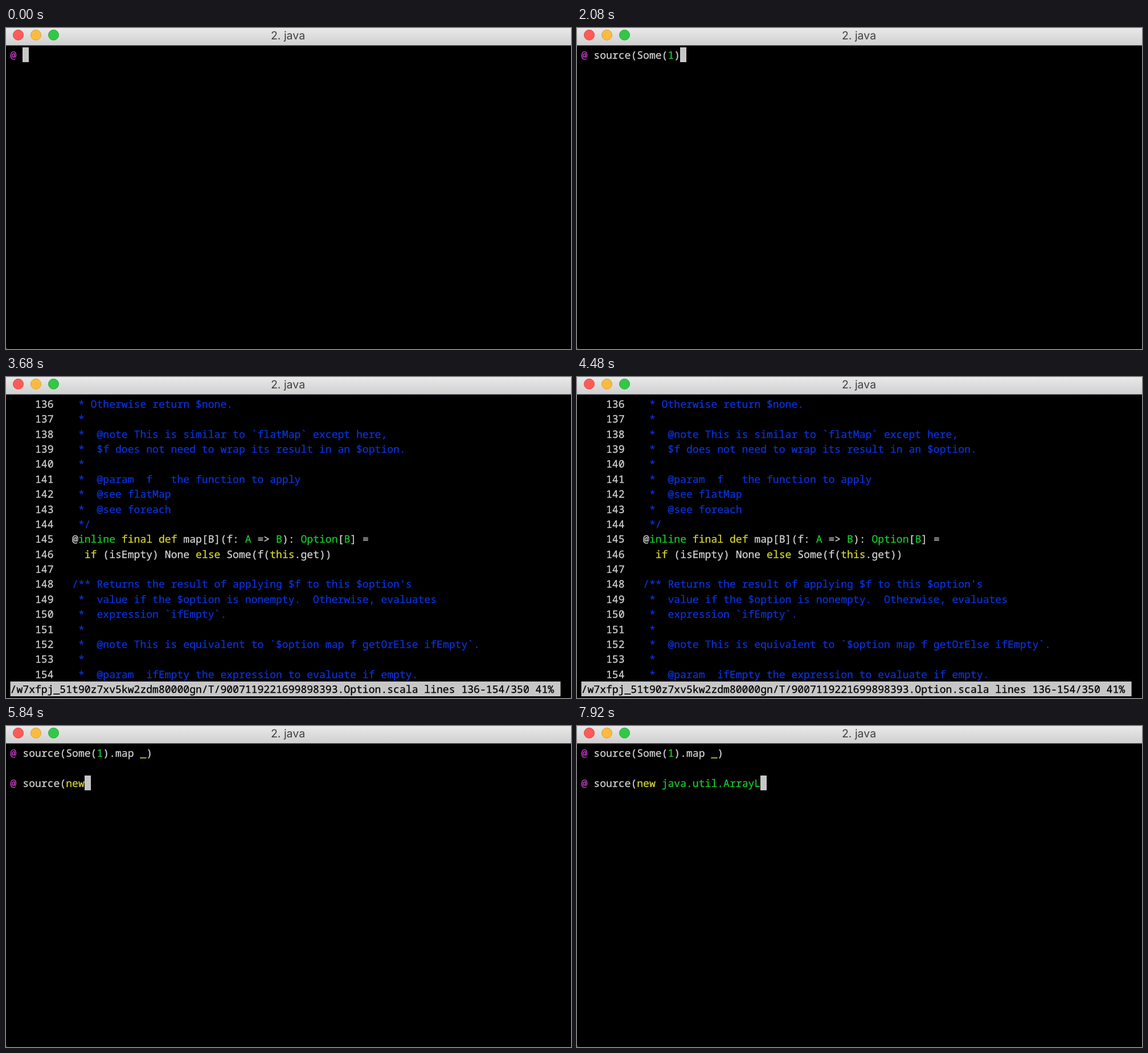
An HTML page that plays this animation: 992x564 px, repeating every 8000 ms.

```html
<!DOCTYPE html>
<html lang="en">
<head>
<meta charset="utf-8">
<title>Terminal</title>
<style>
  html, body { margin: 0; width: 100%; height: 100%; overflow: hidden; background: #000; }
  svg { display: block; width: 992px; height: 564px; }
  text { white-space: pre; text-rendering: geometricPrecision; }
  .mono { font: 18.09px "Noto Sans Mono", "DejaVu Sans Mono", monospace; }
  .mono tspan { stroke-width: 0.3px; }
  .title { font: 19.5px Inter, Roboto, sans-serif; fill: #404040; text-anchor: middle; }
</style>
</head>
<body>
<svg viewBox="0 0 992 564">
  <defs>
    <linearGradient id="bar" x2="0" y2="1">
      <stop offset="0" stop-color="#e9e9e9"/>
      <stop offset="1" stop-color="#d0d0d0"/>
    </linearGradient>
  </defs>
  <rect width="992" height="564"/>
  <g id="shell" class="mono">
    <path d="M0 560V564H3Q0.5 563 0 560Z" fill="#3a3a3a"/>
    <rect id="cursor" width="11" height="26" fill="#c7c7c7"/>
  </g>
  <g id="pager" class="mono"></g>
  <rect width="992" height="30" fill="url(#bar)"/>
  <rect y="30" width="992" height="1" fill="#747884"/>
  <g id="lights" stroke-width="1"></g>
  <text class="title" x="495" y="20">2. java</text>
</svg>
<script>
const LOOP = 8000, STEP = 80;
const LEFT = 7.6, TOP = 34, COL = 10.854, ROW = 26.37;
const PAGER_OPEN = 3200, PAGER_CLOSE = 4560, ENTER = 2880;
const COLORS = {
  w: "#d4d4d4", m: "#c93cc9", g: "#18cb2c", y: "#d6d634", b: "#0a33dc", k: "#000"
};

const $ = id => document.getElementById(id);

function add(parent, tag, attrs, content = "") {
  const el = document.createElementNS("http://www.w3.org/2000/svg", tag);
  for (const key in attrs) el.setAttribute(key, attrs[key]);
  el.textContent = content;
  parent.appendChild(el);
  return el;
}

const addRow = (parent, row) =>
  add(parent, "text", { x: LEFT, y: TOP + 20 + row * ROW });

// Runs are [color key, text] pairs.
function fill(el, runs) {
  el.textContent = "";
  for (const [key, text] of runs) {
    add(el, "tspan", { fill: COLORS[key], stroke: COLORS[key] }, text);
  }
}

// A keyword takes its color only once it is complete.
function cut(runs, count) {
  const shown = [];
  for (const [color, text] of runs) {
    if (count <= 0) break;
    const part = text.slice(0, count);
    shown.push([color === "y" && part !== text ? "w" : color, part]);
    count -= text.length;
  }
  return shown;
}

const first = {
  row: 0, keys: [[400, 0], [2080, 14.4], [2800, 21]],
  runs: [["w", "source(Some("], ["g", "1"], ["w", ").map "], ["y", "_"], ["w", ")"]]
};
const second = {
  row: 2, keys: [[4700, 0], [5040, 3.3], [5840, 10.3], [7200, 22.3], [7920, 27.3]],
  runs: [["w", "source("], ["y", "new"], ["w", " "], ["g", "java.util.ArrayL"]]
};

function typedCount(keys, t) {
  if (t <= keys[0][0]) return 0;
  for (let i = 1; i < keys.length; i++) {
    const [t0, n0] = keys[i - 1], [t1, n1] = keys[i];
    if (t <= t1) return Math.floor(n0 + (n1 - n0) * (t - t0) / (t1 - t0));
  }
  return Math.floor(keys[keys.length - 1][1]);
}

const doc = text => [["b", text]];
const listing = [
  doc("   * Otherwise return $none."),
  doc("   *"),
  doc("   *  @note This is similar to `flatMap` except here,"),
  doc("   *  $f does not need to wrap its result in an $option."),
  doc("   *"),
  doc("   *  @param  f   the function to apply"),
  doc("   *  @see flatMap"),
  doc("   *  @see foreach"),
  doc("   */"),
  [["w", "  @"], ["g", "inline"], ["y", " final def"], ["w", " map[B](f: "], ["g", "A"],
   ["w", " => "], ["g", "B"], ["w", "): "], ["g", "Option"], ["w", "["], ["g", "B"], ["w", "] ="]],
  [["y", "    if"], ["w", " (isEmpty) None "], ["y", "else"], ["w", " Some(f("],
   ["y", "this"], ["w", ".get))"]],
  doc(""),
  doc("  /** Returns the result of applying $f to this $option's"),
  doc("   *  value if the $option is nonempty.  Otherwise, evaluates"),
  doc("   *  expression `ifEmpty`."),
  doc("   *"),
  doc("   *  @note This is equivalent to `$option map f getOrElse ifEmpty`."),
  doc("   *"),
  doc("   *  @param  ifEmpty the expression to evaluate if empty.")
];
const status = "/w7xfpj_51t90z7xv5kw2zdm80000gn/T/9007119221699898393.Option.scala lines 136-154/350 41%";

function build() {
  const lights = [["#fc5b57", "#e2473f"], ["#fabb40", "#dfa032"], ["#33c748", "#25ab35"]];
  lights.forEach(([color, edge], i) =>
    add($("lights"), "circle", { cx: 21.5 + 31 * i, cy: 12.3, r: 9, fill: color, stroke: edge }));

  const pager = $("pager");
  listing.forEach((runs, i) =>
    fill(addRow(pager, i), [["w", `    ${136 + i} `], ...runs]));
  add(pager, "rect", {
    x: LEFT, y: Math.round(TOP + 19 * ROW), width: 89 * COL, height: 26, fill: "#c7c7c7"
  });
  fill(addRow(pager, 19), [["k", status]]);

  for (const line of [first, second]) line.el = addRow($("shell"), line.row);
}

function render(time) {
  const t = Math.floor((time % LOOP) / STEP) * STEP;
  const paging = t >= PAGER_OPEN && t < PAGER_CLOSE;
  $("pager").style.display = paging ? "" : "none";
  $("shell").style.display = paging ? "none" : "";

  const active = t < PAGER_CLOSE ? first : second;
  for (const line of [first, second]) {
    line.count = typedCount(line.keys, t);
    const visible = line === first || active === second;
    fill(line.el, visible ? [["m", "@ "], ...cut(line.runs, line.count)] : []);
  }

  const waiting = t >= ENTER && t < PAGER_OPEN;
  const row = waiting ? 1 : active.row;
  const col = waiting ? 0 : 2 + active.count;
  $("cursor").setAttribute("x", Math.round(LEFT + col * COL));
  $("cursor").setAttribute("y", Math.round(TOP + row * ROW));
}

build();
const start = performance.now();
function tick() {
  render(performance.now() - start);
  requestAnimationFrame(tick);
}
tick();
</script>
</body>
</html>
```
